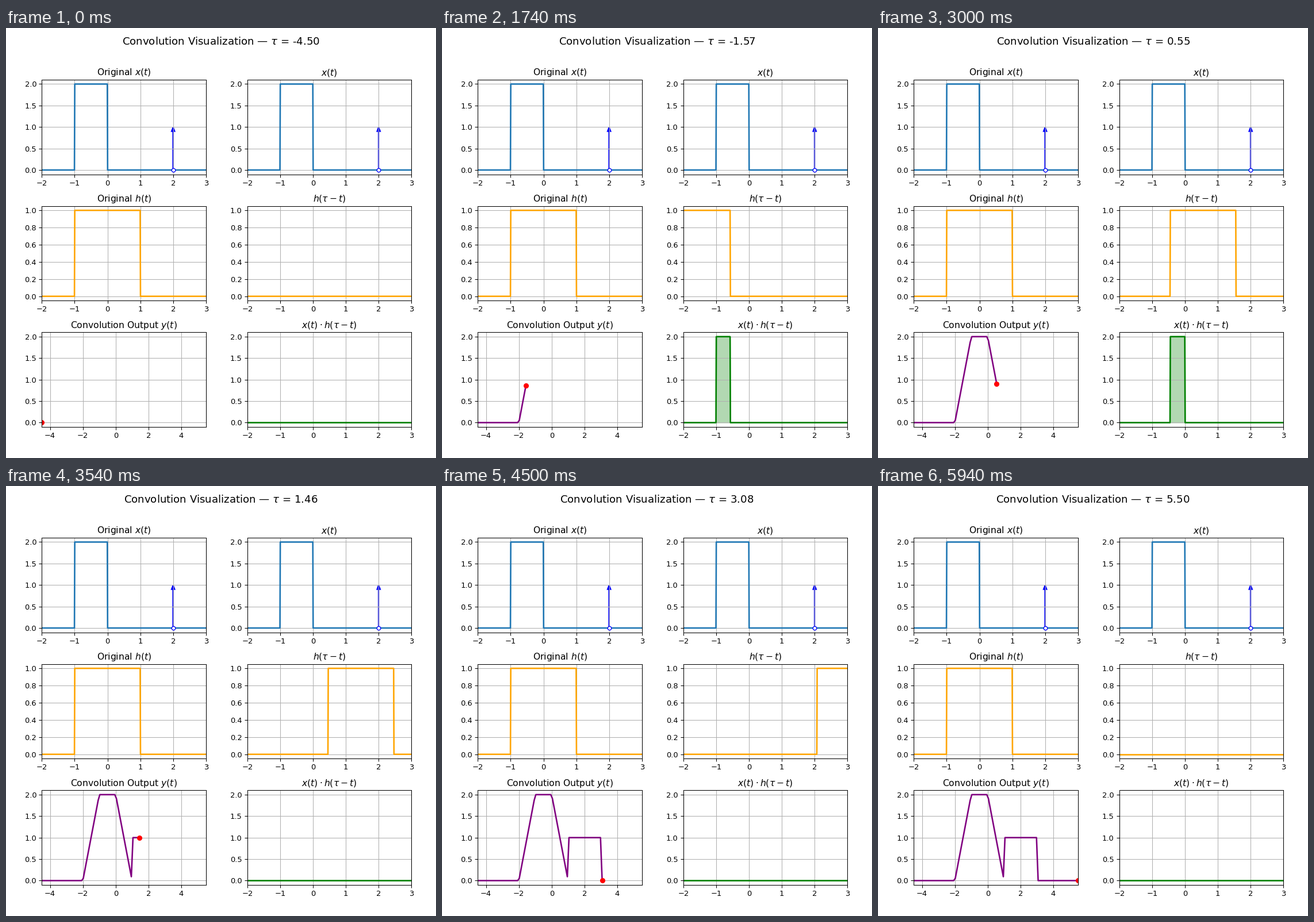
Write a matplotlib script that moves like this. It is 748 by 748 pixels and loops after 6000 ms.

```python
import numpy as np
import matplotlib.pyplot as plt
from matplotlib.animation import FuncAnimation

SIZE = 748
FRAMES = 100
LEFTS = (62.3, 419.8)
TOPS = (90.0, 309.7, 529.4)
WIDTH, HEIGHT = 285.5, 164.5

t = np.linspace(-5, 5, 1000)
taus = np.linspace(-4.5, 5.5, FRAMES)


def box(t, start, end, height=1.0):
    return np.where((t >= start) & (t <= end), height, 0.0)


def convolve(tau):
    """Pulse of height 2 on [-1, 0] plus a unit impulse at 2, with a unit box on [-1, 1]."""
    overlap = np.clip(np.minimum(0, tau + 1) - np.maximum(-1, tau - 1), 0, None)
    return 2 * overlap + box(tau, 1, 3)


def panel(row, col, title, top, xlim=(-2, 3), xticks=range(-2, 4)):
    ax = fig.add_axes([LEFTS[col] / SIZE, 1 - (TOPS[row] + HEIGHT) / SIZE,
                       WIDTH / SIZE, HEIGHT / SIZE])
    ax.set_title(title)
    ax.set_xlim(*xlim)
    ax.set_ylim(-0.05 * top, 1.05 * top)
    ax.set_xticks(list(xticks))
    ax.set_yticks(np.linspace(0, top, 5 if top == 2 else 6))
    ax.grid(True)
    return ax


def draw_signal(ax):
    ax.plot(t, x, lw=2)
    ax.arrow(2, 0, 0, 0.9, head_width=0.1, head_length=0.1,
             fc="blue", ec="blue", lw=1.5)
    ax.plot(2, 0, "o", mfc="white", mec="blue", ms=5)


x = box(t, -1, 0, 2.0)
y = convolve(taus)

fig = plt.figure(figsize=(8, 8), dpi=SIZE / 8)
heading = fig.suptitle("", fontsize=14)

draw_signal(panel(0, 0, "Original $x(t)$", 2))
draw_signal(panel(0, 1, "$x(t)$", 2))

panel(1, 0, "Original $h(t)$", 1).plot(t, box(t, -1, 1), color="orange", lw=2)
flipped, = panel(1, 1, r"$h(\tau - t)$", 1).plot([], [], color="orange", lw=2)

out_ax = panel(2, 0, "Convolution Output $y(t)$", 2, (-4.5, 5.5), range(-4, 5, 2))
trace, = out_ax.plot([], [], color="purple", lw=2)
dot, = out_ax.plot([], [], "ro")

prod_ax = panel(2, 1, r"$x(t) \cdot h(\tau - t)$", 2)
product, = prod_ax.plot([], [], color="green", lw=2)
area = prod_ax.fill_between(t, 0 * t, color="green", alpha=0.3)


def update(i):
    tau = taus[i]
    h = box(t, tau - 1, tau + 1)
    p = x * h
    flipped.set_data(t, h)
    product.set_data(t, p)
    area.set_verts([np.column_stack([np.r_[t[0], t, t[-1]], np.r_[0, p, 0]])])
    trace.set_data(taus[:i + 1], y[:i + 1])
    dot.set_data([tau], [y[i]])
    heading.set_text(rf"Convolution Visualization — $\tau$ = {tau:.2f}")
    return flipped, product, area, trace, dot, heading


anim = FuncAnimation(fig, update, frames=FRAMES, interval=60, repeat=True)
plt.show()
```
